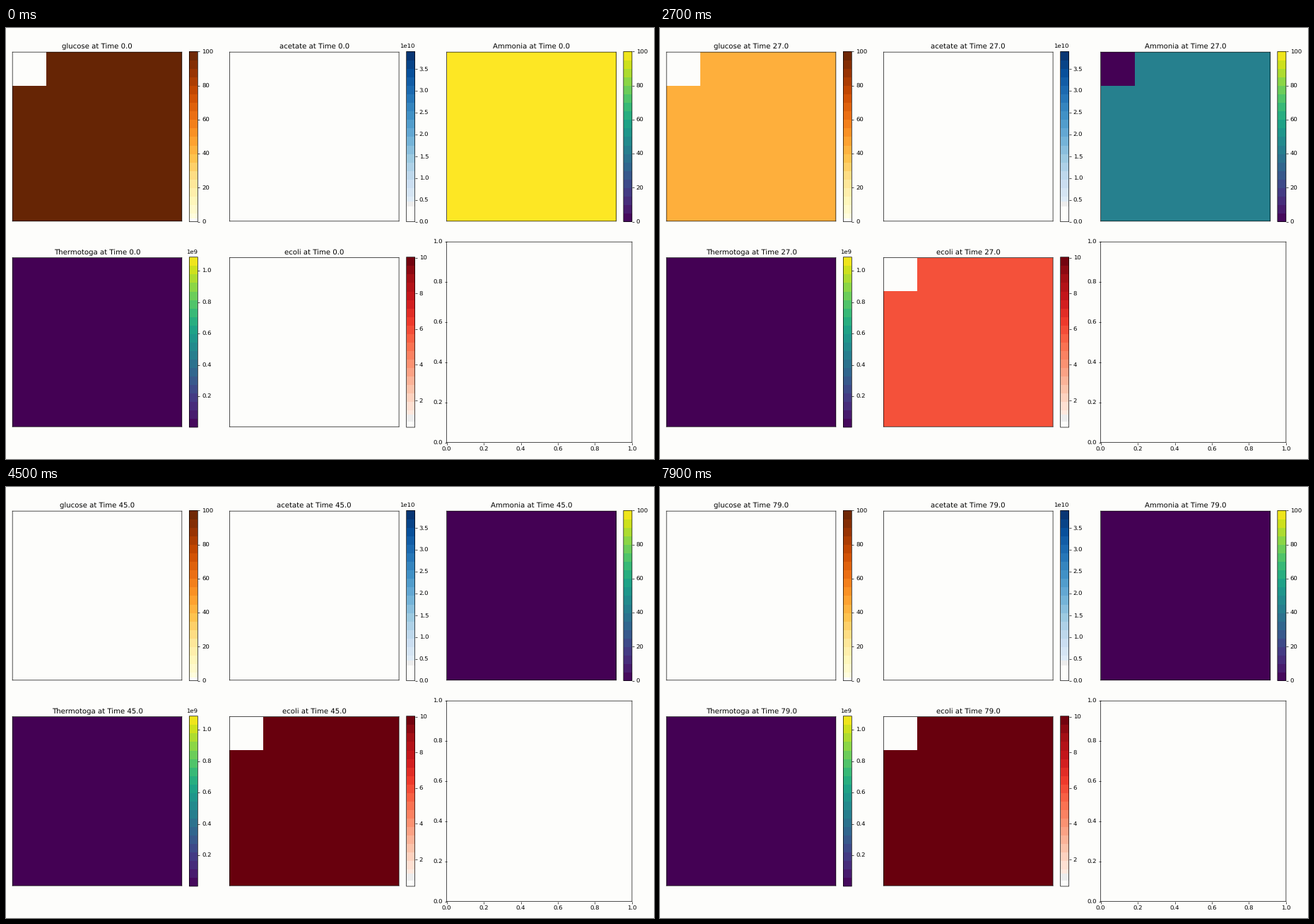
Recreate the animation shown at these times as a matplotlib script. Size 917 by 611 pixels, loop 8000 ms.

```python
import numpy as np
import matplotlib.pyplot as plt
from matplotlib.animation import FuncAnimation
from matplotlib.cm import ScalarMappable
from matplotlib.colors import ListedColormap, Normalize, to_rgb

W, H, DPI = 917, 611, 100
K = W / 1500               # scale from a nominal 15 x 10 inch sheet
FRAMES, STEP = 80, 100
PAPER = "#fdfdfb"

plt.rcParams.update({
    "font.family": "DejaVu Sans",
    "font.size": 10 * K,
    "text.hinting": "none",
    "path.snap": False,
    "axes.facecolor": PAPER,
    "axes.titlesize": 12 * K,
    "axes.titlepad": 6 * K,
    "axes.linewidth": 0.8 * K,
})
for axis in ("xtick", "ytick"):
    plt.rcParams.update({
        f"{axis}.major.width": 0.8 * K,
        f"{axis}.major.size": 3.5 * K,
        f"{axis}.major.pad": 3.5 * K,
        f"{axis}.labelsize": 10 * K,
    })

fig = plt.figure(figsize=(W / DPI, H / DPI), dpi=DPI, facecolor=PAPER)

# Cell size and gaps of the 2 x 3 layout, in pixels
CELL_W, CELL_H, GAP_X, GAP_Y = 262.24, 284.4, 45, 7
LEFT, BOTTOM = 9.17, 587.6
axes = fig.subplots(2, 3, gridspec_kw=dict(
    left=LEFT / W, right=(LEFT + 3 * CELL_W + 2 * GAP_X) / W,
    bottom=1 - BOTTOM / H, top=1 - (BOTTOM - 2 * CELL_H - GAP_Y) / H,
    wspace=GAP_X / CELL_W, hspace=GAP_Y / CELL_H))


def shade(cmap, x, white):
    """Colours for x in 0..1, blank below the given level."""
    rgb = plt.get_cmap(cmap)(x)[..., :3]
    rgb[x < white] = to_rgb(PAPER)
    return rgb


def banded(cmap, white, gray):
    x = (np.arange(240) + 0.5) / 240
    rgb = plt.get_cmap(cmap)((np.floor(x * 20) + 0.5) / 20)[:, :3]
    rgb[x < gray] = 0.93
    rgb[x < white] = to_rgb(PAPER)
    return ListedColormap(rgb)


class Panel:
    def __init__(self, ax, name, cmap, lo, hi, ticks, white=0.0, gray=0.0):
        self.ax, self.name, self.cmap = ax, name, cmap
        self.lo, self.hi, self.white = lo, hi, white
        ax.set(xticks=[], yticks=[])
        self.image = ax.imshow(np.ones((5, 5, 3)), interpolation="nearest")
        scale = ScalarMappable(Normalize(lo, hi), banded(cmap, white, gray))
        fig.colorbar(scale, ax=ax, fraction=0.046, pad=0.04, ticks=ticks)

    def show(self, t, bulk, corner):
        grid = np.full((5, 5), float(bulk))
        grid[0, 0] = corner
        x = np.clip((grid - self.lo) / (self.hi - self.lo), 0, 1)
        self.image.set_data(shade(self.cmap, x, self.white))
        self.ax.set_title(f"{self.name} at Time {t:.1f}")


percent = np.arange(0, 101, 20)
glucose = Panel(axes[0, 0], "glucose", "YlOrBr", 0, 100, percent, white=0.02)
acetate = Panel(axes[0, 1], "acetate", "Blues", 0, 3.906e10,
                np.arange(8) * 5e9, white=0.09, gray=0.12)
ammonia = Panel(axes[0, 2], "Ammonia", "viridis", 0, 100, percent)
thermo = Panel(axes[1, 0], "Thermotoga", "viridis", 2e6, 1.088e9,
               np.arange(1, 6) * 2e8)
ecoli = Panel(axes[1, 1], "ecoli", "Reds", 0.48, 10.05, np.arange(2, 11, 2),
              white=0.035, gray=0.075)

unit = np.arange(6) / 5
axes[1, 2].set(xlim=(0, 1), ylim=(0, 1), xticks=unit, yticks=unit)

SEED, FULL, RATE = 0.5, 10.0, 0.0912


def update(t):
    growth = np.exp(RATE * t)
    cells = min(SEED * growth, FULL)
    food = 100 * (FULL - cells) / (FULL - SEED)
    glucose.show(t, food, 0)
    acetate.show(t, 0, 0)
    ammonia.show(t, food, max(0, 100 - 26 * (growth - 1)))
    thermo.show(t, 0, 0)
    ecoli.show(t, cells, SEED)
    return []


anim = FuncAnimation(fig, update, frames=FRAMES, interval=STEP,
                     init_func=lambda: update(0), repeat=True, repeat_delay=0)
plt.show()
```
